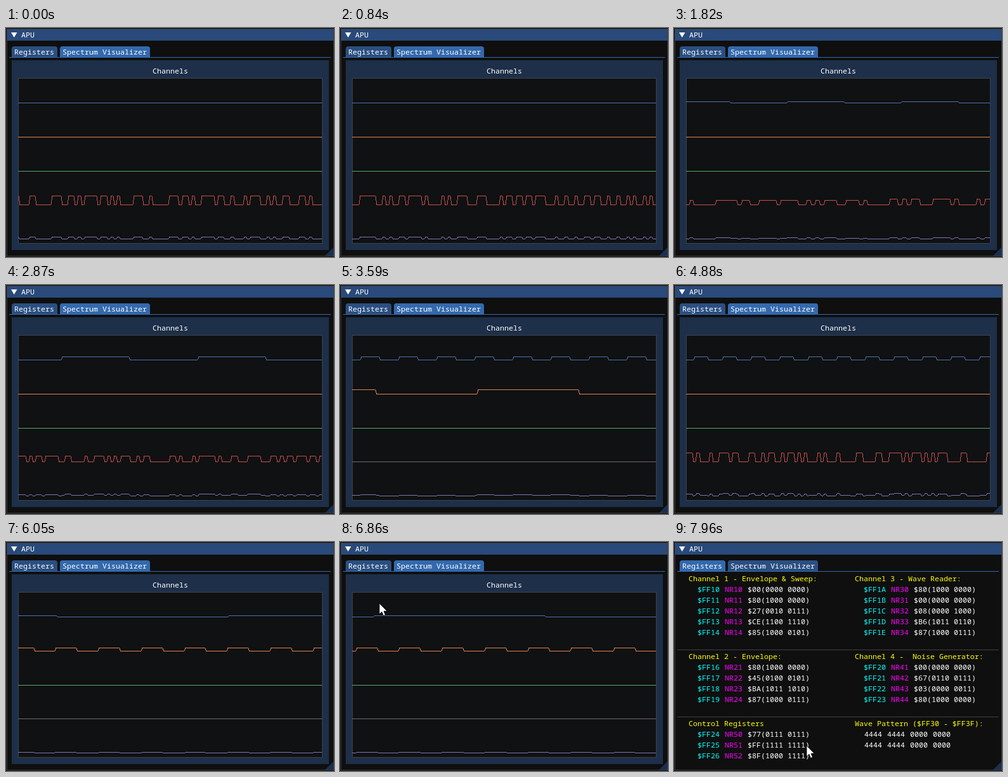
Animation of 517x362 px, one loop 7990 ms. Source, as an HTML page with a canvas:

```html
<!DOCTYPE html>
<html lang="en">
<head>
<meta charset="utf-8">
<title>APU</title>
<style>
html, body { margin: 0; width: 100%; height: 100%; overflow: hidden; background: #0f0f0f; }
canvas { display: block; width: 517px; height: 362px; }
</style>
</head>
<body>
<canvas id="stage" width="517" height="362"></canvas>
<script>
const ctx = document.getElementById('stage').getContext('2d');
const LOOP = 7990, FRAME = 30, SWITCH = 7070;
const LEFT = 19, RIGHT = 498;
const mod = (a, n) => ((a % n) + n) % n;

// pulse: [amplitude, rising edge, half period, drift per frame]
// noise: [older amplitude, newer amplitude, bit width, first bit x, shift register]
const scenes = [
  { from: 0, key: 0, noise: [14, 14, 5.128, 15.5, '100011000001110'] },
  { from: 900, key: 1820, p1: [2, 179, 90, 47], noise: [7, 9, 6.85, 17.2, '010000011111011'] },
  { from: 2200, key: 2870, p1: [5, 87.5, 107.5, 61], noise: [9, 9, 5.14, 15.6, '111010110111100'] },
  { from: 3200, key: 3590, p1: [5, 33, 30, 13], p2: [7, 217, 160, 53] },
  { from: 4200, key: 4880, p1: [5, 31.3, 22.5, 11], noise: [14, 14, 5.14, 14.4, '111010001001110'] },
  { from: 5500, key: 6050, p1: [2, 351, 270, 71], p2: [5, 78, 33.85, 17] }
];

// cursor path: time, x, y
const path = [
  [6170, 150, 362], [6320, 140, 330], [6700, 85, 150], [7040, 36, 38], [7070, 34, 33],
  [7190, 30, 26], [7360, 30, 26], [7420, 32, 33], [7620, 32, 33], [7960, 209, 322]
];

function rect(x, y, w, h, color) {
  ctx.fillStyle = color;
  ctx.fillRect(x, y, w, h);
}

function text(s, x, mid, color = '#fff') {
  ctx.fillStyle = color;
  ctx.fillText(s, x, mid + 4);
}

function shape(points, color) {
  ctx.beginPath();
  for (const [x, y] of points) ctx.lineTo(x, y);
  ctx.closePath();
  ctx.fillStyle = color;
  ctx.fill();
}

// Time of the last buffer refresh; the plot pauses once.
function refreshTime(t) {
  const start = t < 1400 ? 0 : 1400;
  if (!start) t = Math.min(t, 1170);
  return start + Math.floor((t - start) / FRAME) * FRAME;
}

function pulse(def, step) {
  if (!def) return () => 0;
  const [amp, edge, half, drift] = def;
  const rise = edge - step * drift;
  return x => mod(x - rise, half * 2) < half ? amp : 0;
}

// 15-bit linear feedback shift register, inverted output
function noise(def, step) {
  if (!def) return () => 0;
  const [older, newer, width, x0, seed] = def;
  const skip = Math.abs(step) * 41;
  const bits = [...seed].map(Number);
  for (let i = 0; bits.length < skip + 110; i++) bits.push(bits[i] === bits[i + 1] ? 1 : 0);
  return x => bits[skip + Math.max(0, Math.floor((x - x0) / width))] * (x < 320 ? older : newer);
}

// Gives each edge one halfway column.
const soften = f => x => (f(x) + f(x + 1)) / 2;

function trace(f, base, color) {
  let last = Math.round(base - f(LEFT));
  for (let x = LEFT; x < RIGHT; x++) {
    const y = Math.round(base - f(x));
    const top = y < last ? y : Math.min(last + 1, y);
    const bottom = y < last ? last - 1 : y;
    rect(x, top, 1, Math.max(1, bottom - top + 1), color);
    last = y;
  }
}

function drawPlot(t) {
  const now = refreshTime(t);
  const scene = scenes.filter(s => s.from <= now).pop();
  const step = Math.round((now - scene.key) / FRAME);
  const p1 = soften(pulse(scene.p1, step));
  const p2 = soften(pulse(scene.p2, step));
  const ns = soften(noise(scene.noise, step));

  rect(9, 51, 500, 300, '#1d2f49');
  text('Channels', 231, 68);
  rect(19, 79, 480, 262, '#3f434d');
  rect(20, 80, 478, 260, '#101112');
  trace(p1, 118, '#4c72b0');
  trace(p2, 172, '#dd8452');
  trace(() => 0, 226, '#55a868');
  trace(ns, 279, scene.noise ? '#c44e52' : '#6f6a72');
  trace(x => (p1(x) + p2(x) + ns(x)) / 5, 333, '#8172b3');
}

const hex = (n, len = 2) => n.toString(16).toUpperCase().padStart(len, '0');

function registers(title, x, y, address, first, values) {
  text(title, x, y, '#ff0');
  values.forEach((v, i) => {
    const row = y + 17 * (i + 1);
    const b = v.toString(2).padStart(8, '0');
    text('$' + hex(address + i, 4), x + 14, row, '#0ff');
    text('NR' + (first + i), x + 57, row, '#f0f');
    text(`$${hex(v)}(${b.slice(0, 4)} ${b.slice(4)})`, x + 93, row);
  });
}

function drawRegisters(t) {
  const late = t >= 7360;
  registers('Channel 1 - Envelope & Sweep:', 23, 58, 0xFF10, 10,
    [0x00, 0x80, 0x27, late ? 0xCE : 0xC4, 0x85]);
  registers('Channel 3 - Wave Reader:', 285, 58, 0xFF1A, 30,
    [0x80, 0x00, 0x08, late ? 0xB6 : 0x9D, late ? 0x87 : 0x86]);
  registers('Channel 2 - Envelope:', 23, 181, 0xFF16, 21,
    [0x80, 0x45, late ? 0xBA : 0x9D, late ? 0x87 : 0x86]);
  registers('Channel 4 -  Noise Generator:', 285, 181, 0xFF20, 41, [0x00, 0x67, 0x03, 0x80]);
  registers('Control Registers', 23, 287, 0xFF24, 50, [0x77, 0xFF, 0x8F]);
  text('Wave Pattern ($FF30 - $FF3F):', 285, 287, '#ff0');
  for (const y of [304, 321]) {
    ['4444', '4444', '0000', '0000'].forEach((s, i) => text(s, 300 + 36 * i, y));
  }
  for (const y of [170, 276]) rect(5, y, 507, 1, '#3f3f46');
}

function cursorAt(t) {
  if (t < path[0][0]) return null;
  const i = path.findIndex(p => p[0] > t);
  if (i < 0) return path[path.length - 1].slice(1);
  const [t0, x0, y0] = path[i - 1], [t1, x1, y1] = path[i];
  let k = (t - t0) / (t1 - t0);
  if (t0 === 7620) k = k * k * (3 - 2 * k);
  return [Math.round(x0 + (x1 - x0) * k), Math.round(y0 + (y1 - y0) * k)];
}

function drawTab(label, x, w, active, cursor) {
  const hover = cursor && cursor[0] >= x && cursor[0] < x + w && cursor[1] >= 29 && cursor[1] < 46;
  ctx.beginPath();
  ctx.roundRect(x, 29, w, 17, [4, 4, 0, 0]);
  ctx.fillStyle = hover ? '#387bcb' : active ? '#3369ad' : '#2a4f81';
  ctx.fill();
  text(label, x + 4, 38);
}

function drawCursor([x, y]) {
  ctx.save();
  ctx.translate(x, y);
  shape([[0, 0], [0, 17], [4, 13.5], [6.5, 19.5], [9.5, 18.3], [7, 12.5], [12, 12]], '#fff');
  ctx.strokeStyle = '#000';
  ctx.lineWidth = 0.8;
  ctx.stroke();
  ctx.restore();
}

function draw(t) {
  const cursor = cursorAt(t), showRegisters = t >= SWITCH;
  ctx.font = '11.667px "Noto Sans Mono", "DejaVu Sans Mono", monospace';
  rect(0, 0, 517, 362, '#111');
  rect(1, 1, 516, 360, '#3b3b42');
  rect(2, 2, 514, 358, '#0f0f0f');
  rect(2, 2, 514, 18, '#294a7a');
  shape([[8, 7], [17.5, 7], [12.75, 15]], '#fff');
  text('APU', 24, 11);
  drawTab('Registers', 9, 72, showRegisters, cursor);
  drawTab('Spectrum Visualizer', 85, 142, !showRegisters, cursor);
  rect(5, 46, 507, 1, '#3369ad');
  if (showRegisters) drawRegisters(t); else drawPlot(t);
  shape([[516, 347], [516, 360], [503, 360]], '#193050');
  if (cursor) drawCursor(cursor);
}

function tick(now) {
  draw(now % LOOP);
  requestAnimationFrame(tick);
}
draw(0);
requestAnimationFrame(tick);
</script>
</body>
</html>
```
